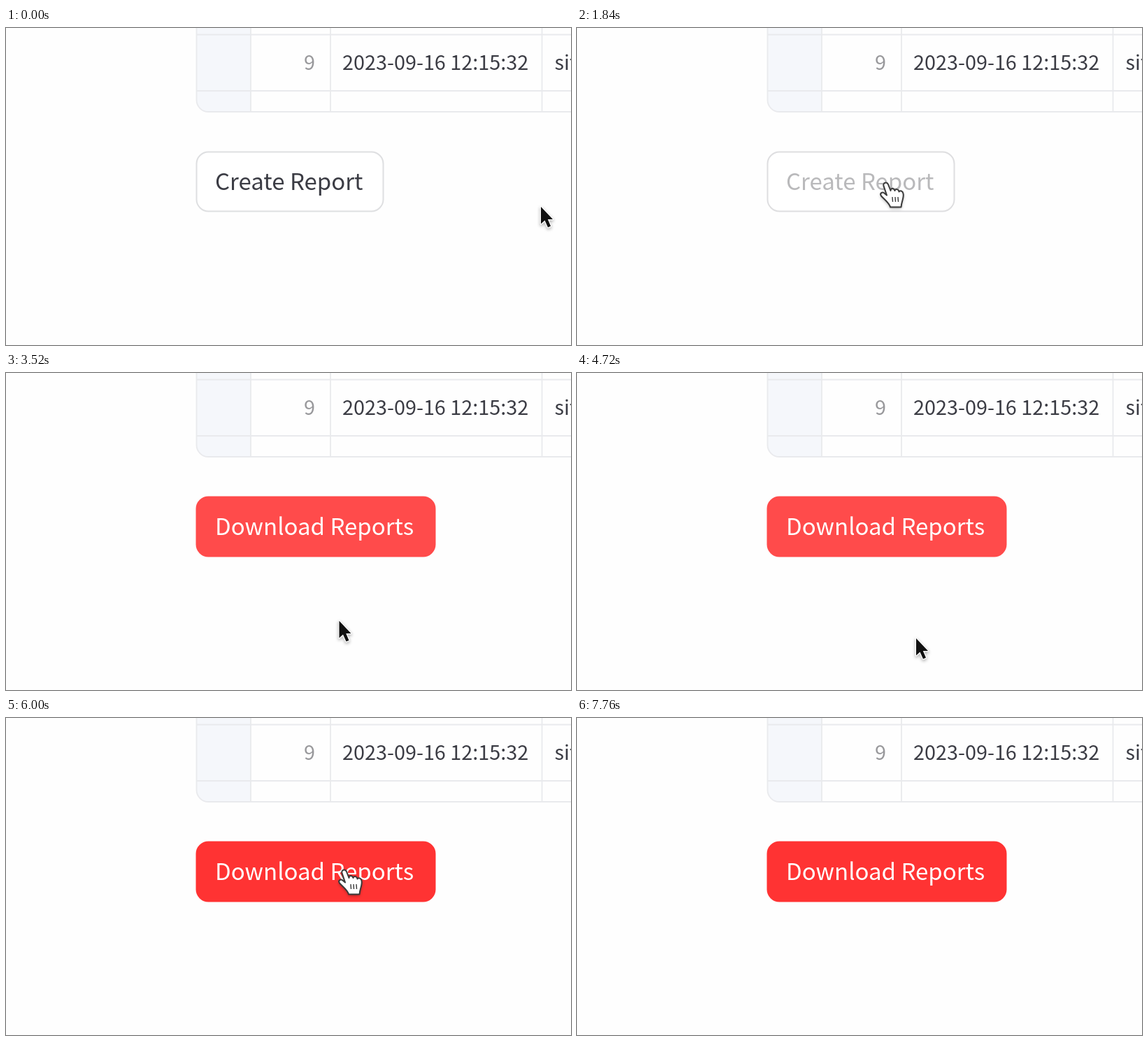
These frames come from a looping animation (808 by 454 pixels, 7.84 s). An HTML page with a canvas:

```html
<!DOCTYPE html>
<html lang="en">
<head>
<meta charset="utf-8">
<title>Create and download report</title>
<style>
  html, body { margin: 0; width: 100%; height: 100%; overflow: hidden; background: #fefefe; }
  canvas { display: block; }
</style>
</head>
<body>
<canvas id="stage" width="808" height="454"></canvas>
<script>
const ctx = document.getElementById('stage').getContext('2d');
const LOOP = 7840, TICK = 80;
const FONT = '"Noto Sans CJK JP", "Noto Sans CJK SC", "Noto Sans CJK", "Noto Sans", sans-serif';
const INK = '#3b3c44', FADED = '#b9b9bb', LINE = '#e9eaed';
const RED = '#ff4b4b', HOT = '#ff3333', WHITE = '#ffffff';

// Pointer stops: time, x, y
const STOPS = [
  [0, 765, 256], [320, 500, 252], [480, 500, 252], [1040, 442, 222],
  [3120, 442, 222], [3680, 485, 388], [3760, 485, 388], [4000, 485, 380],
  [5120, 485, 380], [5920, 484, 218], [LOOP, 484, 218]
];
const POINTER_GONE = 7360;

function pointerAt(t) {
  const i = STOPS.findIndex((s, n) => n > 0 && t <= s[0]);
  const [t0, x0, y0] = STOPS[i - 1], [t1, x1, y1] = STOPS[i];
  const p = (t - t0) / (t1 - t0);
  const e = p * p * (3 - 2 * p);
  return { x: x0 + (x1 - x0) * e, y: y0 + (y1 - y0) * e };
}

function text(str, x, y, size, color) {
  ctx.font = `400 ${size}px ${FONT}`;
  ctx.fillStyle = color;
  ctx.fillText(str, x, y);
}

function line(x0, y0, x1, y1) {
  ctx.beginPath();
  ctx.moveTo(x0, y0);
  ctx.lineTo(x1, y1);
  ctx.stroke();
}

function drawTable() {
  ctx.beginPath();
  ctx.roundRect(272.5, -40, 600, 160, 17);
  ctx.save();
  ctx.clip();
  ctx.fillStyle = '#f5f7fb';
  ctx.fillRect(272, -20, 78, 141);
  ctx.restore();

  ctx.strokeStyle = LINE;
  ctx.lineWidth = 1.8;
  ctx.beginPath();
  ctx.roundRect(272.5, -40, 600, 160, 17);
  ctx.stroke();
  for (const y of [9.5, 90]) line(273, y, 830, y);
  for (const x of [350, 464, 766.5]) line(x, -20, x, 120);

  text('9', 426, 59.5, 28.8, '#98989b');
  text('2023-09-16 12:15:32', 481, 59.5, 28.8, INK);
  text('sit', 784.5, 59.5, 28.8, INK);
}

function drawButton(label, width, { fill, border, color }) {
  ctx.beginPath();
  ctx.roundRect(272.5, 177.5, width, 85, 17);
  ctx.fillStyle = fill;
  ctx.fill();
  ctx.strokeStyle = border;
  ctx.lineWidth = 2;
  ctx.stroke();
  text(label, 299, 231.5, 33, color);
}

const filled = red => ({ fill: red, border: red, color: WHITE });
const outlined = (border, color) => ({ fill: WHITE, border, color });
const DISABLED = outlined('#dedee0', FADED);

function createStyle(t, hover) {
  if (t >= 1200 && t < 1360) return filled(RED);
  if (t >= 1360 && t < 2000) return DISABLED;
  return hover ? outlined(RED, RED) : outlined('#dedfe1', INK);
}

function downloadStyle(t, hover) {
  if (t >= 6160 && t < 6400) return outlined(RED, RED);
  if (t >= 6400 && t < 6560) return DISABLED;
  return filled(hover ? HOT : RED);
}

function withShadow(draw) {
  ctx.save();
  ctx.shadowColor = 'rgba(0,0,0,.35)';
  ctx.shadowBlur = 4;
  ctx.shadowOffsetY = 2;
  draw();
  ctx.restore();
}

const ARROW = new Path2D('M0 0V24.5L5.5 19.5L10 29.5L14 27.8L9.8 18H17Z');
const HAND = new Path2D(
  'M-3.5 4C-5 0 1 -2.5 3 2L6.5 11C6.5 7 11 7 12.5 11' +
  'C13 8 18 8.5 18.5 12.5C20 10 24 11.5 24.5 15' +
  'C26 21 22 26 21.5 34.5H6C5 29 -1 25 -7 18.5' +
  'C-9.5 15 -5.5 11.5 -2 15L1 17.5Z');

function drawArrow() {
  ctx.strokeStyle = WHITE;
  ctx.lineWidth = 2.5;
  withShadow(() => ctx.stroke(ARROW));
  ctx.fillStyle = '#111';
  ctx.fill(ARROW);
}

function drawHand() {
  ctx.fillStyle = WHITE;
  withShadow(() => ctx.fill(HAND));
  ctx.strokeStyle = '#3a3a3a';
  ctx.lineWidth = 2;
  ctx.stroke(HAND);
  ctx.lineWidth = 1.4;
  for (const x of [9, 13, 17]) line(x, 20, x + 0.5, 27);
}

function render(t) {
  const { x, y } = pointerAt(t);
  const download = t >= 2560;
  const width = download ? 341 : 267;
  const hover = x < 272 + width && y < 263;

  ctx.filter = 'none';
  ctx.fillStyle = '#fefefe';
  ctx.fillRect(0, 0, 808, 454);
  ctx.filter = 'blur(0.7px)';
  drawTable();
  if (download) drawButton('Download Reports', width, downloadStyle(t, hover));
  else drawButton('Create Report', width, createStyle(t, hover));

  if (t >= POINTER_GONE) return;
  ctx.save();
  ctx.lineJoin = 'round';
  ctx.translate(x, y);
  if (hover) drawHand();
  else drawArrow();
  ctx.restore();
}

const start = performance.now();
function frame() {
  const t = (performance.now() - start) % LOOP;
  render(Math.floor(t / TICK) * TICK);
  requestAnimationFrame(frame);
}
frame();
</script>
</body>
</html>
```
